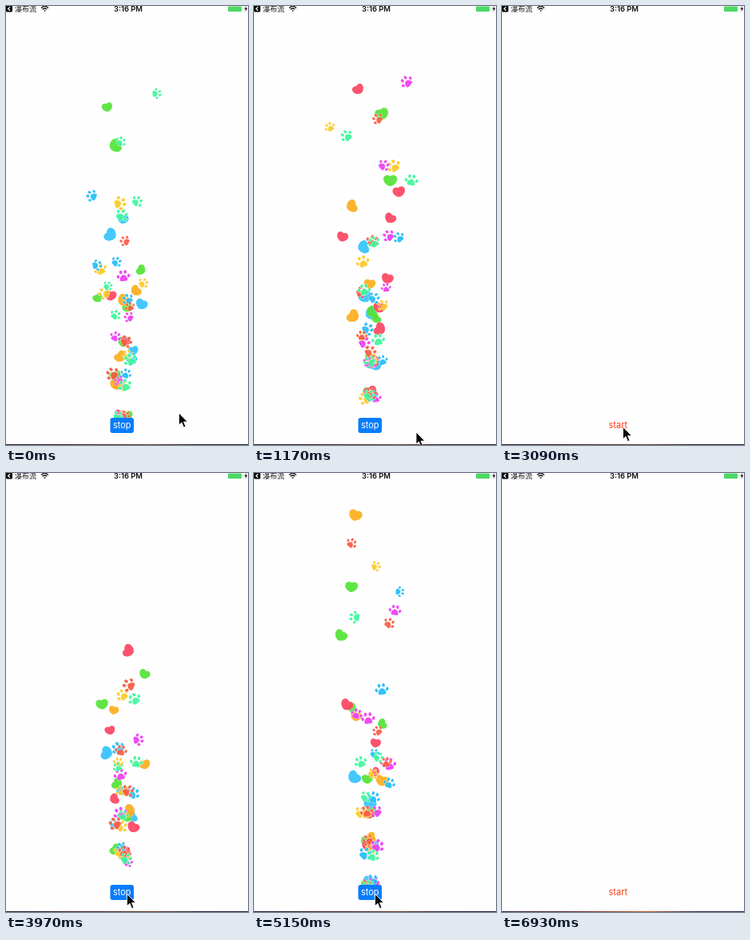
These frames come from a looping animation (303x549 px, 7.03 s). An HTML page:

```html
<!DOCTYPE html>
<html lang="en">
<head>
<meta charset="utf-8">
<title>Paw fountain</title>
<style>
  html, body { margin: 0; width: 100%; height: 100%; overflow: hidden; background: #fefefe; }
  svg { display: block; width: 100vw; height: 100vh; }
  .ui { font-family: Inter, Roboto, sans-serif; }
  .cjk { font-family: "Noto Sans CJK SC", "Noto Sans CJK", sans-serif; }
</style>
</head>
<body>
<svg viewBox="0 0 303 549" preserveAspectRatio="none">
  <defs>
    <path id="heart" d="M0 6.6C-3 6.4-8 3-8-1.6C-8-6.6-3-7.4 0-5.2C3-7.4 8-6.6 8-1.6C8 3 3 6.4 0 6.6Z"/>
    <g id="paw">
      <path d="M0-1.6C2.6-1.6 4.9 1.7 4.7 4.2C4.5 6.4 1.8 5.9 0 5.9S-4.5 6.4-4.7 4.2C-4.9 1.7-2.6-1.6 0-1.6Z"/>
      <ellipse cx="-6.5" cy="0" rx="1.7" ry="2.2" transform="rotate(-25 -6.5 0)"/>
      <ellipse cx="-2.7" cy="-5" rx="1.8" ry="2.3"/>
      <ellipse cx="2.7" cy="-5" rx="1.8" ry="2.3"/>
      <ellipse cx="6.5" cy="0" rx="1.7" ry="2.2" transform="rotate(25 6.5 0)"/>
    </g>
    <linearGradient id="edge">
      <stop offset="0" stop-color="#2a2440"/>
      <stop offset=".3" stop-color="#6a2d3c"/>
      <stop offset=".6" stop-color="#c4602c"/>
      <stop offset=".78" stop-color="#353055"/>
      <stop offset="1" stop-color="#1f2a4a"/>
    </linearGradient>
  </defs>
  <rect width="303" height="549" fill="#fefefe"/>

  <rect y="-.5" width="8" height="8" rx="1.6" fill="#050505"/>
  <path d="M5 1.2L2.6 3.5L5 5.8" fill="none" stroke="#fff" stroke-width="1.2"/>
  <text class="cjk" x="11" y="7" font-size="9" fill="#111">瀑布流</text>
  <g fill="none" stroke="#111" stroke-width="1.3">
    <path d="M44 2.4Q48.5-1.6 53 2.4M45.7 4.2Q48.5 1.7 51.3 4.2"/>
    <path d="M47.5 5.8L48.5 6.8L49.5 5.8Z" fill="#111" stroke-width=".6"/>
  </g>
  <text class="ui" x="153" y="7.2" font-size="9.4" font-weight="600" text-anchor="middle" fill="#111">3:16 PM</text>
  <rect x="278" y=".4" width="17" height="6.6" rx="1.2" fill="#4cd964"/>
  <path d="M296 2.2Q297.4 3.6 296 5Z" fill="#4cd964"/>
  <path d="M301.2 0L298.4 4H300.2L299.4 7.2L302.4 3H300.6Z" fill="#111"/>

  <g id="bits"></g>
  <rect id="button" x="130.5" y="515" width="29.5" height="19" rx="3" fill="#087cfb"/>
  <text id="label" class="ui" x="145.3" y="528.3" font-size="11" text-anchor="middle"></text>
  <rect y="548" width="303" height="1" fill="#1c1c2c"/>
  <rect id="strip" y="548" width="303" height="1" fill="url(#edge)"/>
  <path id="cursor" d="M0 0V15L3.5 11.8L6 18L8.5 17L6 11H10.8Z" fill="#050505" stroke="#fff" stroke-width=".8"/>
</svg>
<script>
const LOOP = 7030, STEP = 147.3, LAST_STEP = 47, MAX_LIFE = 1.15;
const HEARTS = ['#35c3fc', '#54e337', '#fc4562', '#fcae1e'];
const PAWS = ['#fccb2b', '#ee3ff1', '#22bdf9', '#fb5b41', '#3df89b'];
const KINDS = [
  ...HEARTS.map(color => ({ shape: '#heart', color, size: 0.78, line: 0.4 })),
  ...PAWS.map(color => ({ shape: '#paw', color, size: 0.78, line: 0.9 }))
];
// Each run throws one bit of every kind per burst; times in seconds.
const RUNS = [
  { first: -1.243, from: 0, to: 3.05, period: 0.1022, seed: 11 },
  { first: 3.352, from: 3.35, to: 6.15, period: 0.1051, seed: 47 }
];
// Cursor stops: step, x, y
const PATH = [[0, 216.5, 509], [5, 206, 527], [8, 203, 533], [10, 203, 533], [14, 154.5, 528], [16, 151.5, 526.5],
  [42, 151.5, 526.5], [43, 176, 530], [44, 254, 537], [45, 290, 570]];

const $ = id => document.getElementById(id);
const bits = $('bits'), button = $('button'), label = $('label'), cursor = $('cursor'), strip = $('strip');
const pool = [];

function random(seed) {
  let s = seed | 0;
  return () => {
    s = s + 0x6D2B79F5 | 0;
    let r = Math.imul(s ^ s >>> 15, 1 | s);
    r = r + Math.imul(r ^ r >>> 7, 61 | r) ^ r;
    return ((r ^ r >>> 14) >>> 0) / 4294967296;
  };
}

function bitAt(i) {
  if (!pool[i]) {
    pool[i] = document.createElementNS('http://www.w3.org/2000/svg', 'use');
    pool[i].setAttribute('stroke', '#fff');
    pool[i].setAttribute('paint-order', 'stroke');
    pool[i].setAttribute('opacity', 0.92);
    bits.append(pool[i]);
  }
  return pool[i];
}

function place(el, kind, age, rnd) {
  const life = 0.35 + 0.8 * rnd() ** 1.8;
  if (age > life) return false;
  const turn = rnd() * Math.PI * 2, offset = 5.5 * Math.sqrt(rnd());
  const speed = 430 + 130 * (rnd() - 0.5);
  const angle = 0.2 * (rnd() + rnd() - 1);
  const scale = kind.size + 0.3 * rnd();
  const tilt = 150 * (rnd() - 0.5) + 60 * (rnd() - 0.5) * age;
  const x = 145.5 + Math.cos(turn) * offset + Math.sin(angle) * speed * age;
  const y = 520 + Math.sin(turn) * offset - Math.cos(angle) * speed * age;
  el.setAttribute('href', kind.shape);
  el.setAttribute('fill', kind.color);
  el.setAttribute('stroke-width', kind.line);
  el.setAttribute('transform', `translate(${x} ${y}) rotate(${tilt}) scale(${scale})`);
  return true;
}

function drawBits(run, time) {
  let used = 0;
  if (run) {
    const last = Math.floor((time - run.first) / run.period);
    const start = Math.max(0, last - Math.ceil(MAX_LIFE / run.period));
    KINDS.forEach((kind, j) => {
      for (let n = start; n <= last; n++) {
        const age = time - run.first - n * run.period;
        const rnd = random(run.seed * 7919 + n * 613 + j * 37);
        if (place(bitAt(used), kind, age, rnd)) used++;
      }
    });
  }
  pool.forEach((el, i) => el.setAttribute('display', i < used ? 'inline' : 'none'));
}

function drawCursor(step) {
  let i = 0;
  while (i < PATH.length - 2 && step > PATH[i + 1][0]) i++;
  const [a, ax, ay] = PATH[i], [b, bx, by] = PATH[i + 1];
  const p = Math.min(1, (step - a) / (b - a));
  cursor.setAttribute('transform', `translate(${ax + (bx - ax) * p} ${ay + (by - ay) * p})`);
}

let shown = -1;
function draw(ms) {
  const step = Math.min(LAST_STEP, Math.floor((ms % LOOP + 12) / STEP));
  if (step === shown) return;
  shown = step;
  const time = step * STEP / 1000;
  const run = RUNS.find(r => time >= r.from && time < r.to);
  button.setAttribute('visibility', run ? 'visible' : 'hidden');
  label.textContent = run ? 'stop' : 'start';
  label.setAttribute('fill', run ? '#fff' : '#fc3d14');
  strip.setAttribute('opacity', step === LAST_STEP ? 1 : 0.45);
  drawBits(run, time);
  drawCursor(step);
}

const begin = performance.now();
function tick() {
  draw(performance.now() - begin);
  requestAnimationFrame(tick);
}
tick();
</script>
</body>
</html>
```
